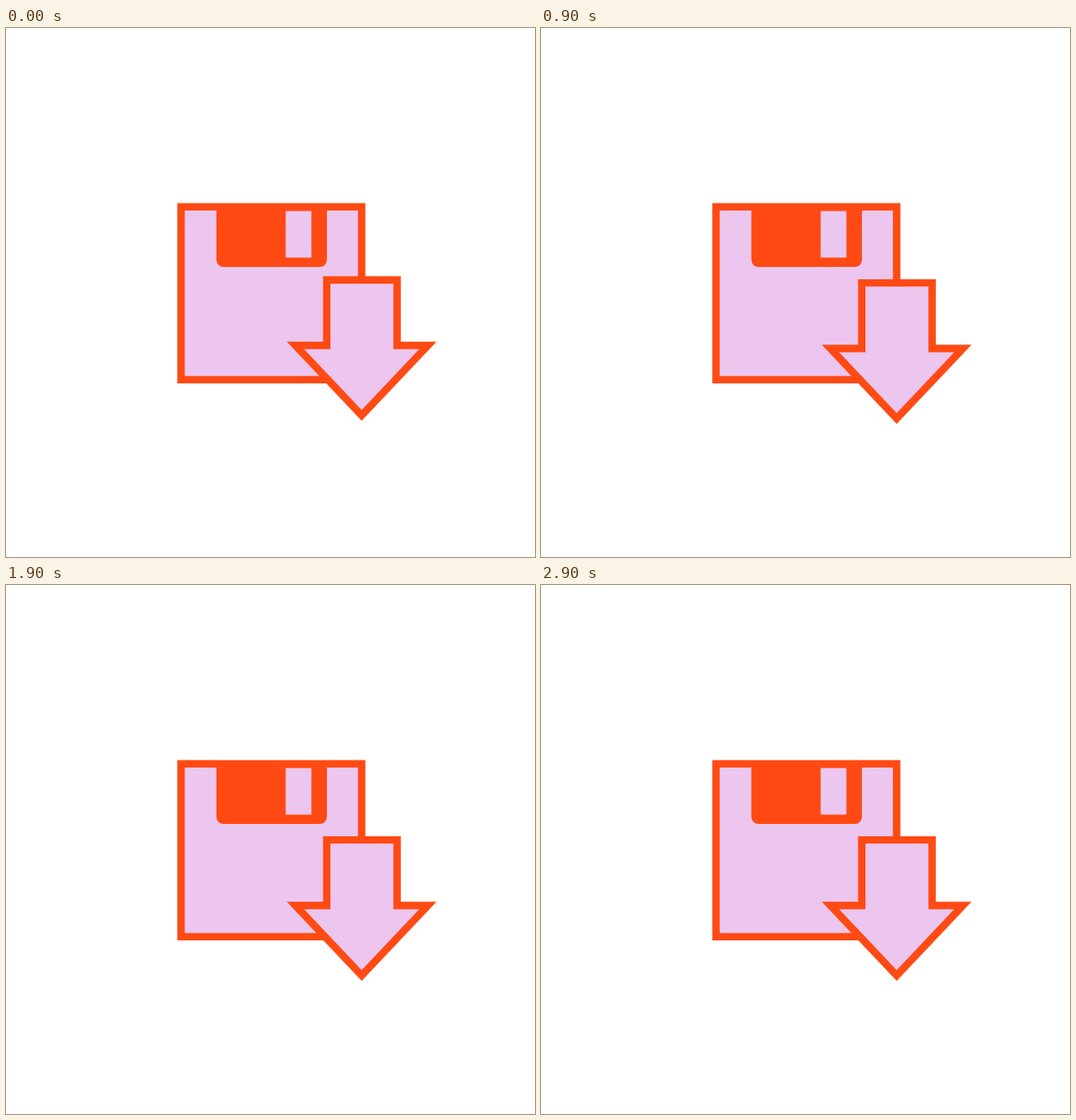
These frames come from a looping animation (600x600 px, 3000 ms). An HTML page:

```html
<!DOCTYPE html>
<html lang="en">
<head>
<meta charset="utf-8">
<title>Save</title>
<style>
  html, body { margin: 0; width: 100%; height: 100%; overflow: hidden; background: #fff; }
  svg { display: block; width: 100%; height: 100%; }
  .box { fill: #ecc6ee; stroke: #ff4a14; stroke-width: 8.4; stroke-linejoin: miter; stroke-miterlimit: 6; }
</style>
</head>
<body>
<svg viewBox="0 0 600 600">
  <rect class="box" x="198.5" y="202.8" width="204.9" height="196.1"/>
  <path fill="#ff4a14" d="M238.6 203H364V263a8 8 0 0 1 -8 8H246.6a8 8 0 0 1 -8 -8Z"/>
  <rect fill="#ecc6ee" x="317.2" y="207.6" width="29.2" height="52.8"/>
  <path id="arrow" class="box" d="M363.8 285.7H443.6V360H478.6L403.4 439.5L328.2 360H363.8Z"/>
</svg>
<script>
  const LOOP = 3000, BOB = 1000, STEP = 100, DROP = 36.5;
  const arrow = document.getElementById('arrow');

  const ease = x => x * (0.7 + x * (1.5 - 1.2 * x));

  // The arrow sinks for half a bob, then rises with the same easing.
  function offset(ms) {
    const x = (ms % BOB) / (BOB / 2);
    return DROP * (x < 1 ? ease(x) : 1 - ease(x - 1));
  }

  function draw(ms) {
    const t = Math.floor((ms % LOOP) / STEP) * STEP;
    arrow.setAttribute('transform', `translate(0 ${offset(t).toFixed(2)})`);
  }

  let start;
  function tick(now) {
    if (start === undefined) start = now;
    draw(now - start);
    requestAnimationFrame(tick);
  }
  draw(0);
  requestAnimationFrame(tick);
</script>
</body>
</html>
```
